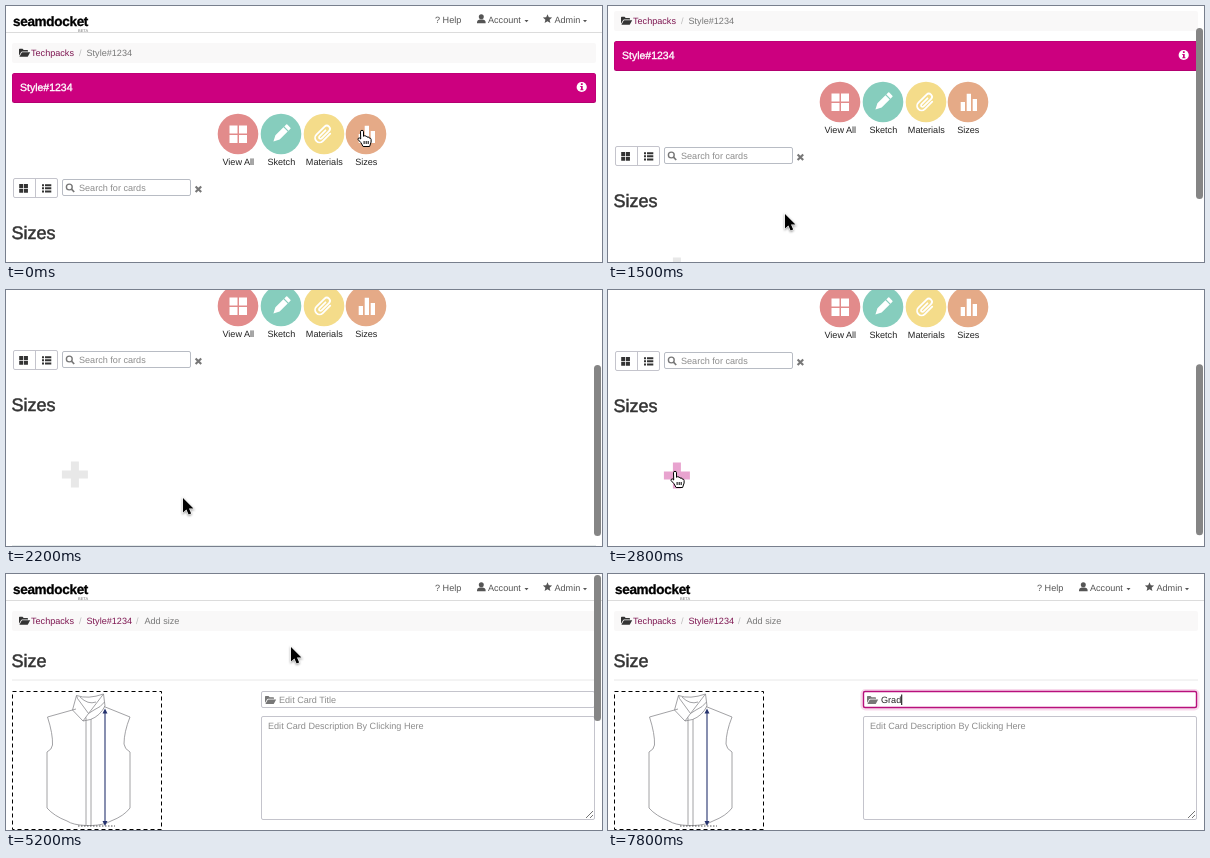
An HTML page for the animation above (8000 ms loop, 596x256 px).

```html
<!DOCTYPE html>
<html lang="en">
<head>
<meta charset="utf-8">
<title>Adding a size card</title>
<style>
html, body { margin: 0; width: 100%; height: 100%; overflow: hidden; background: #fff; }
svg { display: block; width: 596px; height: 256px; }
text { font: 9.1px "Liberation Sans", Arial, sans-serif; fill: #777; text-rendering: geometricPrecision; white-space: pre; }
.nav text { fill: #555; }
.nav path, .nav circle { fill: #555; }
.link { fill: #7d1550; }
.slash { fill: #bbb; }
.head { font-size: 18px; fill: #333; stroke: #333; stroke-width: .5; }
.bar { font-size: 10.5px; fill: #fff; stroke: #fff; stroke-width: .35; }
.label { fill: #222; text-anchor: middle; }
.hint { fill: #8c8c8c; }
.logo { font-size: 13.5px; font-weight: bold; letter-spacing: -.3px; fill: #000; stroke: #000; stroke-width: .3; }
.box { fill: #fff; stroke: #c4c4cc; }
.line { fill: none; stroke: #8b8b8f; stroke-width: .8; }
</style>
</head>
<body>
<svg viewBox="0 0 596 256">
  <defs>
    <path id="folder" d="M0 7.5V1.2Q0 .5 .7 .5H3.5L4.7 1.8H8.3Q9 1.8 9 2.5V3.2H3.2Q2.4 3.2 2 4ZM.4 8.5L2.6 4.4Q2.9 4 3.4 4H11.2L9 8Q8.7 8.5 8.2 8.5Z"/>
    <path id="grid" d="M0 0h8v8h-8zM9.5 0h8v8h-8zM0 9.5h8v8h-8zM9.5 9.5h8v8h-8z"/>
    <g id="top">
      <text class="logo" x="7" y="20">seamdocket</text>
      <text x="72" y="25.5" style="font-size:4px">BETA</text>
      <path d="M0 26.5H596" stroke="#dcdcdc"/>
      <g class="nav">
        <text x="429" y="16.5">? Help</text>
        <circle cx="475.3" cy="10.8" r="2.5"/>
        <path d="M471 17.3v-1.6q.3-1.6 2.8-2.2h3q2.5 .6 2.8 2.2v1.6z"/>
        <text x="482" y="16.5">Account</text>
        <path d="M518.5 14h4l-2 2.2z"/>
        <path d="M541.5 8.3l1.3 3 3.3 .3-2.5 2.2 .8 3.2-2.9-1.7-2.9 1.7 .8-3.2-2.5-2.2 3.3-.3z"/>
        <text x="548.5" y="16.5">Admin</text>
        <path d="M577 14h4l-2 2.2z"/>
      </g>
      <rect x="6" y="37" width="584" height="20" rx="2" fill="#f9f8f8"/>
      <use href="#folder" x="13" y="42.3" fill="#333"/>
      <text class="link" x="25" y="50">Techpacks</text>
      <text class="slash" x="73" y="50">/</text>
    </g>
    <clipPath id="photo"><rect x="6" y="117" width="150" height="139"/></clipPath>
  </defs>

  <g id="listPage">
    <use href="#top"/>
    <text x="80.5" y="50">Style#1234</text>
    <rect x="6" y="67" width="584" height="30" rx="2.5" fill="#b30070"/>
    <rect x="6.5" y="67.5" width="583" height="28.5" rx="2" fill="#cc007f"/>
    <text class="bar" x="14" y="85">Style#1234</text>
    <circle cx="575.7" cy="81" r="5.1" fill="#fff"/>
    <path d="M574.9 77.3h1.8v1.7h-1.8zM574.3 80h2.4v3.2h.7v1.1h-3.1v-1.1h.7v-2.1h-.7z" fill="#cc007f"/>

    <g id="tools"></g>
    <use href="#grid" transform="translate(223.5 119.5)" fill="#fff"/>
    <path transform="translate(274.5 128.5) rotate(45)" fill="#fff" d="M-3 -7.2h6V4.2L0 10 -3 4.2zM-3 -11q0-.8 .8-.8h4.4q.8 0 .8 .8v2.6h-6z"/>
    <path transform="translate(317.5 128) rotate(45)" fill="none" stroke="#fff" stroke-width="1.8" stroke-linecap="round"
      d="M4.5 -5V5.5A4.5 4.5 0 0 1 -4.5 5.5V-6A3.1 3.1 0 0 1 1.8 -6V4.5A1.5 1.5 0 0 1 -1.2 4.5V-4"/>
    <path fill="#fff" d="M352.7 128h4.3v9h-4.3zM358.7 119.8h4.3V137h-4.3zM364.7 125h4.3v12h-4.3z"/>

    <rect class="box" x="7.5" y="172.5" width="44" height="19" rx="1.5"/>
    <path d="M29.5 172.5v19" stroke="#c4c4cc"/>
    <use href="#grid" transform="translate(13.2 178) scale(.5)" fill="#333"/>
    <path d="M36 178.2h2v2h-2zM39 178.2h6.3v2H39zM36 181.3h2v2h-2zM39 181.3h6.3v2H39zM36 184.4h2v2h-2zM39 184.4h6.3v2H39z" fill="#333"/>
    <rect class="box" x="56.5" y="173.5" width="128" height="16" rx="1.5" style="stroke:#b8bcc4"/>
    <circle cx="63.3" cy="181" r="2.9" fill="none" stroke="#777" stroke-width="1.4"/>
    <path d="M65.5 183.2l2.7 2.8" stroke="#777" stroke-width="1.7"/>
    <text class="hint" x="73" y="185">Search for cards</text>
    <path d="M189.6 180.5l5.6 5.6M195.2 180.5l-5.6 5.6" stroke="#777" stroke-width="2.1"/>
    <text class="head" x="5.5" y="233">Sizes</text>
    <path id="plus" d="M68.9 283.5v26M55.9 296.5h26" stroke-width="8"/>
    <path d="M6 367.5H590" stroke="#e6ebeb"/>
  </g>

  <g id="formPage">
    <use href="#top"/>
    <text class="link" x="80.5" y="50">Style#1234</text>
    <text class="slash" x="130" y="50">/</text>
    <text x="138.5" y="50">Add size</text>
    <text class="head" x="5.5" y="93">Size</text>
    <path d="M6 106H590" stroke="#e8e8e8"/>

    <g clip-path="url(#photo)">
      <g class="line">
        <path d="M70 135L41.500 143Q47 160 46.500 171Q46 175.500 41 178V234Q48 242 61 247Q67 251 80 251.500H86Q98 251 105 247Q118 242 124 234V178Q118.500 175 118 170Q118 158 124 143L98 132.500"/>
        <path d="M80 143.500V251.500M85 145V251.500"/>
        <path d="M70.500 121.500L66.500 136 77 147 82.500 139.500 71.500 124.500ZM70.500 121.500Q82 125.500 97.500 120L99 132Q94 142 84.500 145.500L77 147M82.500 139.500L97.500 120M74 123Q82 131 90 128M82.500 139.500L88 136Q95 133 98.500 128"/>
      </g>
      <path d="M72 252H109" stroke="#444" stroke-width=".9" stroke-dasharray="1.500 1.500"/>
      <path d="M99 138V249" stroke="#26336e" stroke-width="1.100"/>
      <path d="M99 134.500l2.500 5h-5zM99 252l2.500-5h-5z" fill="#26336e"/>
    </g>
    <rect x="6.5" y="117.5" width="149" height="138" fill="none" stroke="#000" stroke-dasharray="4 3"/>

    <rect id="glow" x="254.5" y="117" width="335" height="17.5" rx="3" fill="none" stroke="#cc007f" stroke-width="4"/>
    <rect class="box" x="255.5" y="117.5" width="333" height="16" rx="1.5"/>
    <rect id="focus" x="255.5" y="117.5" width="333" height="16" rx="1.5" fill="none" stroke="#b8107c" stroke-width="1.4"/>
    <use href="#folder" x="259" y="121.500" fill="#777"/>
    <text id="title" x="273" y="129"></text>
    <path id="caret" stroke="#000"/>
    <rect class="box" x="255.5" y="142.5" width="333" height="103" rx="1.5"/>
    <text class="hint" x="262" y="155">Edit Card Description By Clicking Here</text>
    <path d="M580 244l7-7M584 244l3-3" stroke="#666" stroke-width=".9"/>
  </g>

  <rect id="thumb" x="588" width="7" rx="3.5" fill="#858585"/>

  <g id="hand">
    <path transform="translate(-4.5 0)" fill="#fff" stroke="#000" stroke-linejoin="round"
      d="M3 1.800a1.500 1.500 0 0 1 3 0v4.500l1.200-.6 1.600 .5 .7 .9 1.500-.2 .8 1.200 1.300 .2 .5 1.200v2.500l-1.500 4.500H5.600L3.400 12.600 .6 9.600q-.4-1.600 1.200-1.700L3.200 9zM6.600 11v3M8.700 11v3M10.700 11v3"/>
  </g>
  <path id="arrow" d="M0 0V14.500L3.400 11.400 5.600 16.500 8.200 15.400 6 10.600H10.500Z" fill="#000" stroke="#fff" stroke-width="1.200"
    paint-order="stroke" style="filter:drop-shadow(0 1px 1px #0006)"/>
  <path id="beam" d="M-3 -7Q0 -7 0 -5V5Q0 7 -3 7M3 -7Q0 -7 0 -5M0 5Q0 7 3 7M-2 2H2" fill="none" stroke="#333" stroke-width="1.200"/>
</svg>
<script>
const LOOP = 8000, STEP = 100;
const $ = id => document.getElementById(id);
const set = (id, attrs) => {
  for (const k in attrs) $(id).setAttribute(k, attrs[k]);
};
const show = (id, on) => set(id, { visibility: on ? 'visible' : 'hidden' });
const smooth = p => p * p * (3 - 2 * p);
const linear = p => p;

// Keys are [time, value, value...]; the value rests outside them.
function track(keys, t, ease) {
  if (t <= keys[0][0]) return keys[0].slice(1);
  for (let i = 1; i < keys.length; i++) {
    const a = keys[i - 1], b = keys[i];
    if (t > b[0]) continue;
    const p = ease((t - a[0]) / (b[0] - a[0]));
    return a.slice(1).map((v, j) => v + (b[j + 1] - v) * p);
  }
  return keys[keys.length - 1].slice(1);
}

const pointerKeys = [
  [500, 356, 124], [1400, 177, 208],
  [2300, 177, 208], [2800, 67, 181],
  [3500, 67, 181], [4200, 266, 43.5], [4400, 357, 41],
  [5200, 285, 73],
  [5300, 285, 73], [6200, 291, 119]
];
const scrollKeys = [
  [1300, 0], [1400, 12], [1500, 32], [1700, 72], [1900, 98],
  [2100, 110], [2200, 112], [2400, 112], [2500, 111]
];
const typed = [[7000, 'G'], [7300, 'Gr'], [7600, 'Gra'], [7800, 'Grad']];

[['View All', 232, '#e28b8b'], ['Sketch', 275, '#86cdbd'],
 ['Materials', 318, '#f4dc8a'], ['Sizes', 360, '#e5aa87']].forEach(([name, x, color]) => {
  $('tools').innerHTML += `<circle cx="${x}" cy="128" r="20.3" fill="${color}"/>
    <text class="label" x="${x + .3}" y="158.500">${name}</text>`;
});

function draw(t) {
  const onForm = t >= 4500;
  const [scroll] = track(scrollKeys, t, linear);
  const [x, y] = track(pointerKeys, t, smooth);

  set('listPage', { transform: `translate(0 ${-Math.round(scroll)})`, display: onForm ? 'none' : 'inline' });
  set('formPage', { display: onForm ? 'inline' : 'none' });
  set('plus', { stroke: t >= 2700 ? '#e8a3cf' : '#e8e8e8' });

  const fade = track([[6200, 1], [6500, 0]], t, linear)[0];
  set('thumb', {
    y: onForm ? 1 : 1 + scroll * .66,
    height: onForm ? 146 : 171,
    opacity: t < 1400 ? 0 : fade
  });

  const focus = 1 - fade;
  set('focus', { opacity: focus });
  set('glow', { opacity: focus * .15 });

  const text = typed.filter(k => t >= k[0]).map(k => k[1]).pop() || '';
  const title = $('title');
  title.textContent = text || 'Edit Card Title';
  title.style.fill = text ? '#222' : '#8c8c8c';
  const end = onForm && text ? 273.5 + title.getComputedTextLength() : 273.5;
  set('caret', { d: `M${end} 120.500v10.500`, opacity: text ? 1 : 0 });

  const kind = t >= 7000 ? '' : t >= 6100 ? 'beam'
    : t < 800 || (t >= 2700 && !onForm) ? 'hand' : 'arrow';
  for (const id of ['hand', 'arrow', 'beam']) {
    show(id, id === kind);
    set(id, { transform: `translate(${x} ${y})` });
  }
}

function frame(now) {
  draw(Math.floor(now % LOOP / STEP) * STEP);
  requestAnimationFrame(frame);
}
draw(0);
requestAnimationFrame(frame);
</script>
</body>
</html>
```
